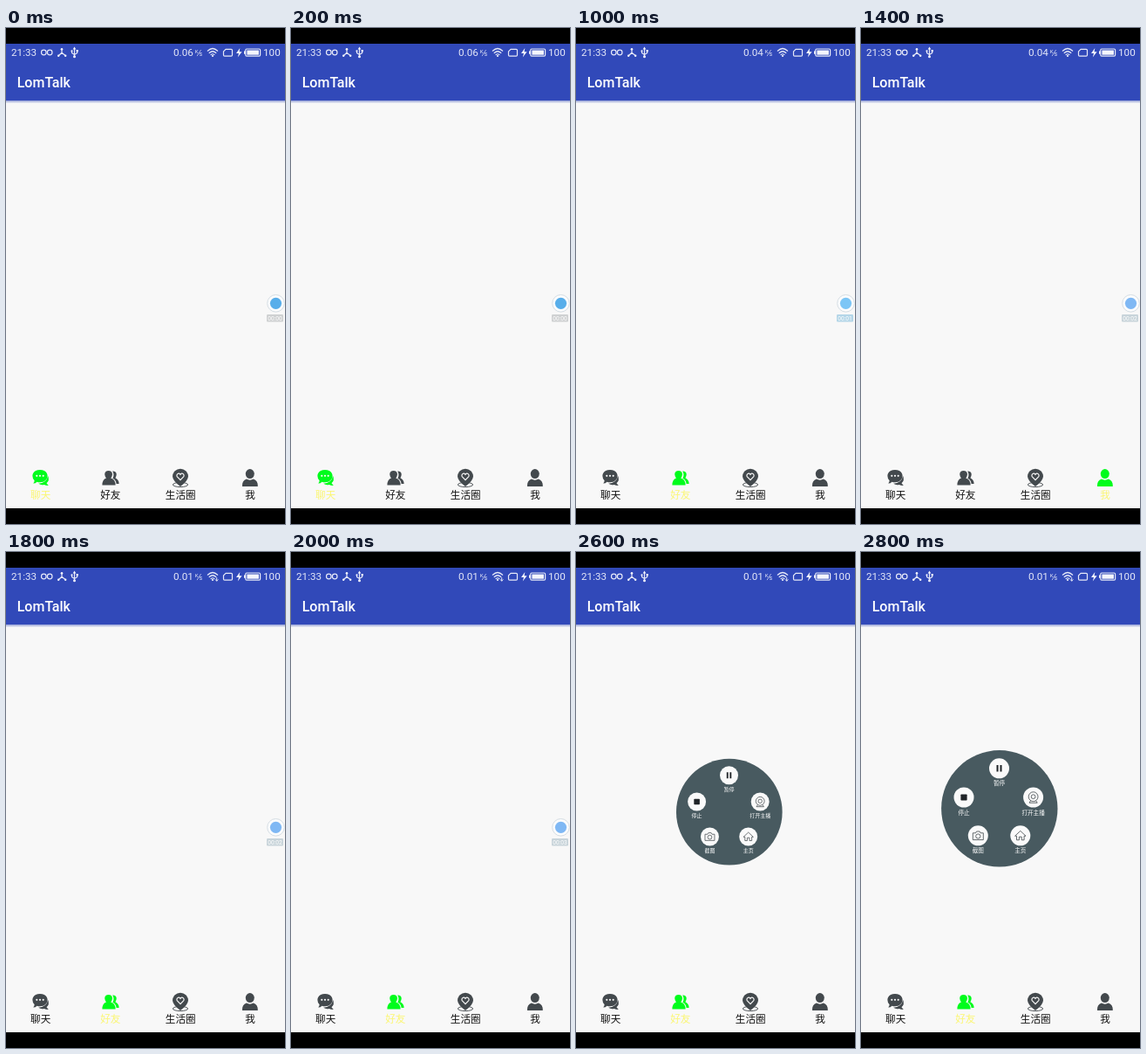
Write an HTML page that moves like this. It is 320x568 px and loops after 3 s.

```html
<!DOCTYPE html>
<html lang="zh">
<head>
<meta charset="utf-8">
<title>LomTalk</title>
<style>
  html, body { margin: 0; width: 100%; height: 100%; overflow: hidden; background: #000; }
  svg { display: block; width: 320px; height: 568px; }
  text { font-family: Roboto, "Noto Sans CJK SC", "Noto Sans CJK", sans-serif; }
  .status { fill: #e6e9f8; font-size: 11.7px; }
  .line { fill: none; stroke: #e6e9f8; stroke-width: 1.2; stroke-linecap: round; stroke-linejoin: round; }
  .solid { fill: #f4f5fc; }
  .label { font-size: 11.6px; text-anchor: middle; fill: #111; }
  .tab { color: #43494d; }
  .tab.on { color: #00fc1c; }
  .tab.on .label { fill: #fbf672; }
  .icon { fill: currentColor; }
  .cut { fill: #f8f8f8; }
  .menu text { font-size: 6.6px; text-anchor: middle; fill: #fff; }
  .disc { fill: #fafafa; }
  .ink { fill: none; stroke: #3e464a; stroke-width: .8; stroke-linejoin: round; }
  .dark { fill: #202428; }
</style>
</head>
<body>
<svg viewBox="0 0 320 568">
  <defs>
    <linearGradient id="shade" x1="0" y1="0" x2="0" y2="1">
      <stop offset="0" stop-color="#a9b3dc"/>
      <stop offset="1" stop-color="#f8f8f8"/>
    </linearGradient>
  </defs>
  <rect width="320" height="568" fill="#000"/>
  <rect y="18" width="320" height="532" fill="#f8f8f8"/>
  <rect y="18" width="320" height="65.5" fill="#3149b9"/>
  <rect y="83.5" width="320" height="3" fill="url(#shade)"/>
  <text x="12.7" y="67.5" font-size="16" font-weight="500" fill="#fff">LomTalk</text>

  <!-- status bar -->
  <text class="status" x="6" y="32">21:33</text>
  <g class="line">
    <circle cx="43.3" cy="28" r="2.8"/>
    <circle cx="50.2" cy="28" r="2.8"/>
    <path d="M64 24.3V28.2L60.3 31.8M64 28.2L68.2 31.8"/>
    <path d="M78.5 23.5V32.5M75.5 26.5V28.5L78.5 30.5L81.7 28.5V26.2"/>
  </g>
  <g class="solid">
    <circle cx="64" cy="24.2" r="1.3"/>
    <circle cx="60.2" cy="31.8" r="1.2"/>
    <circle cx="68.2" cy="31.8" r="1.2"/>
    <path d="M76.7 24.5L78.5 21.5L80.3 24.5Z"/>
    <circle cx="78.5" cy="32.8" r="1.5"/>
    <circle cx="75.5" cy="26.3" r="1.1"/>
    <rect x="80.6" y="25" width="2.2" height="2.2"/>
  </g>
  <text class="status" id="speed" x="192" y="32"></text>
  <g class="status">
    <text x="216.8" y="28.7" style="font-size:6px">K</text>
    <text x="221.8" y="32.4" style="font-size:6.5px">s</text>
  </g>
  <path class="line" style="stroke-width:.7" d="M219.3 31.8L223.4 25.4"/>
  <g class="line">
    <path d="M231.3 26.2Q237 20.8 242.7 26.2M233.2 28.5Q237 25 240.8 28.5M235 30.6Q237 28.9 239 30.6"/>
    <path d="M252 24.3H258.3Q259.5 24.3 259.5 25.5V31Q259.5 32.2 258.3 32.2H250.7Q249.5 32.2 249.5 31V26.8Z"/>
    <rect x="274.8" y="24" width="16.8" height="8.2" rx="1.2"/>
  </g>
  <circle class="solid" cx="237" cy="32" r="1.1"/>
  <path id="traffic" class="line" style="stroke-width:1" d="M241.7 29.7V33M240.3 31.7L241.7 33.2L243.1 31.7"/>
  <path class="solid" d="M268.3 23L264 28.9H267L265.8 33.4L270.6 27.2H267.6Z"/>
  <rect class="solid" x="276.4" y="25.5" width="13.6" height="5.2"/>
  <rect class="solid" x="273" y="26.4" width="1.6" height="3.4"/>
  <text class="status" x="295" y="32">100</text>

  <!-- bottom tabs -->
  <g class="tab">
    <g class="icon">
      <path d="M48.2 513Q50.3 518 46.5 521.3L48.8 524Q45.3 524 43.8 522.9Q40 523.7 37.2 521.8Q46.3 521.4 48.2 513Z"/>
      <path d="M39 506C44.2 506 47.6 509 47.6 513S44.2 520.2 39 520.2Q37 520.2 35.5 519.7Q34 521.5 31.2 521.6Q32.6 520 32.7 518.2Q30.4 516.2 30.4 513C30.4 509 33.8 506 39 506Z"/>
    </g>
    <g class="cut"><circle cx="35.3" cy="512.8" r="1.1"/><circle cx="39" cy="512.8" r="1.1"/><circle cx="42.7" cy="512.8" r="1.1"/></g>
    <text class="label" x="39.7" y="538.5">聊天</text>
  </g>
  <g class="tab">
    <g class="icon">
      <path d="M122.2 507.6C126 507.3 127.5 510 126.3 513.2Q125.8 514.6 125.4 515.2Q129.6 517.2 129.6 522H126.6Q126.2 517.5 122.4 515.8Q124.6 511.5 122.2 507.6Z"/>
      <path d="M117.6 507C120.8 507 122.2 509.2 121.9 511.8Q121.5 514.2 120.2 515.6Q125.6 517.2 125.6 523.6H110.4Q110.4 517.2 115 515.6Q113.7 514.2 113.3 511.8C113 509.2 114.4 507 117.6 507Z"/>
    </g>
    <text class="label" x="119.8" y="538.5">好友</text>
  </g>
  <g class="tab">
    <ellipse cx="200" cy="523" rx="8.6" ry="2.6" fill="none" stroke="currentColor" stroke-width=".9"/>
    <path class="icon" d="M200 504.8A9 9 0 0 1 209 513.6Q208.6 519 200 525Q191.4 519 191 513.6A9 9 0 0 1 200 504.8Z"/>
    <path fill="none" stroke="#f8f8f8" stroke-width="1.2" d="M200 517.6L196.4 513.8C194.6 511.4 198.2 508.6 200 511.3C201.8 508.6 205.4 511.4 203.6 513.8Z"/>
    <text class="label" x="200.2" y="538.5">生活圈</text>
  </g>
  <g class="tab">
    <g class="icon">
      <ellipse cx="279.8" cy="510.6" rx="5" ry="5.5"/>
      <path d="M271 525Q270.5 518.6 275.8 516.6Q279.8 518.8 283.8 516.6Q289.2 518.6 288.8 525Z"/>
    </g>
    <text class="label" x="280" y="538.5">我</text>
  </g>

  <!-- floating recorder button -->
  <g id="bubble">
    <circle cx="309.5" cy="315.3" r="9.8" fill="#fbfcfd" stroke="#d5dde3" stroke-width="1"/>
    <circle id="dot" cx="309.5" cy="315.3" r="6.6"/>
    <rect id="plate" x="299" y="328" width="19" height="8.4" rx="1.2"/>
    <text id="timer" x="308.5" y="334.7" font-size="6.6" text-anchor="middle" fill="#fff"></text>
  </g>

  <!-- round menu, laid out around its own centre -->
  <g id="menu" class="menu">
    <circle r="66.7" fill="#485a60"/>
    <g transform="translate(-.3 -46)">
      <circle class="disc" r="11.5"/>
      <path class="dark" d="M-3-3.8H-1V3.8H-3ZM1-3.8H3V3.8H1Z"/>
      <text y="19.6">暂停</text>
    </g>
    <g transform="translate(-40.8 -12.8)">
      <circle class="disc" r="11.5"/>
      <rect class="dark" x="-3.6" y="-3.6" width="7.2" height="7.2" rx=".8"/>
      <text y="19.6">停止</text>
    </g>
    <g transform="translate(38.8 -12.8)">
      <circle class="disc" r="11.5"/>
      <g class="ink"><circle cy="-.8" r="5.4"/><circle cy="-.8" r="2.4"/><path d="M-3 3.8L-4.6 6.2H4.6L3 3.8"/></g>
      <text y="19.6">打开主播</text>
    </g>
    <g transform="translate(-24.5 31)">
      <circle class="disc" r="11.5"/>
      <g class="ink"><path d="M-6-3H-2.8L-1.8-4.8H1.8L2.8-3H6V4.8H-6Z"/><circle cy=".7" r="2.6"/></g>
      <text y="19.6">截图</text>
    </g>
    <g transform="translate(24 31)">
      <circle class="disc" r="11.5"/>
      <path class="ink" d="M-6.2 .4L0-5.4L6.2 .4H4.3V5H1.4V1.4H-1.4V5H-4.3V.4Z"/>
      <text y="19.6">主页</text>
    </g>
  </g>
</svg>
<script>
  const LOOP = 3000, STEP = 200;
  const $ = id => document.getElementById(id);
  const tabs = [...document.querySelectorAll('.tab')];

  // Each track is a list of [start ms, value], held until the next entry.
  const tracks = {
    tab: [[0, 0], [1000, 1], [1200, 2], [1400, 3], [1600, 2], [1800, 1]],
    speed: [[0, '0.06'], [400, '0.04'], [1800, '0.01']],
    timer: [[0, '00:00'], [600, '00:01'], [1400, '00:02'], [2000, '00:03']],
    dot: [[0, '#58aeea'], [400, '#7cc6f6'], [1200, '#7fb8f4']],
    plate: [[0, '#cfd1d2'], [400, '#b4d6e8'], [1200, '#c8d4da']],
    menu: [[0, null], [2600, [175.8, 297.7, .912]], [2800, [158.8, 293.8, 1]]]
  };
  const at = (name, t) => tracks[name].filter(k => k[0] <= t).pop()[1];
  const show = (el, on) => el.style.display = on ? '' : 'none';

  function draw(t) {
    const active = at('tab', t), menu = at('menu', t);
    tabs.forEach((el, i) => el.classList.toggle('on', i === active));
    $('speed').textContent = at('speed', t);
    $('timer').textContent = at('timer', t);
    $('dot').style.fill = at('dot', t);
    $('plate').style.fill = at('plate', t);
    show($('traffic'), t >= 1800);
    show($('bubble'), t < 2400);
    show($('menu'), menu);
    if (menu) $('menu').setAttribute('transform', `translate(${menu[0]} ${menu[1]}) scale(${menu[2]})`);
  }

  const start = performance.now();
  let last = -1;
  function tick() {
    const t = (performance.now() - start) % LOOP;
    const step = Math.floor(t / STEP);
    if (step !== last) draw((last = step) * STEP);
    requestAnimationFrame(tick);
  }
  tick();
</script>
</body>
</html>
```
